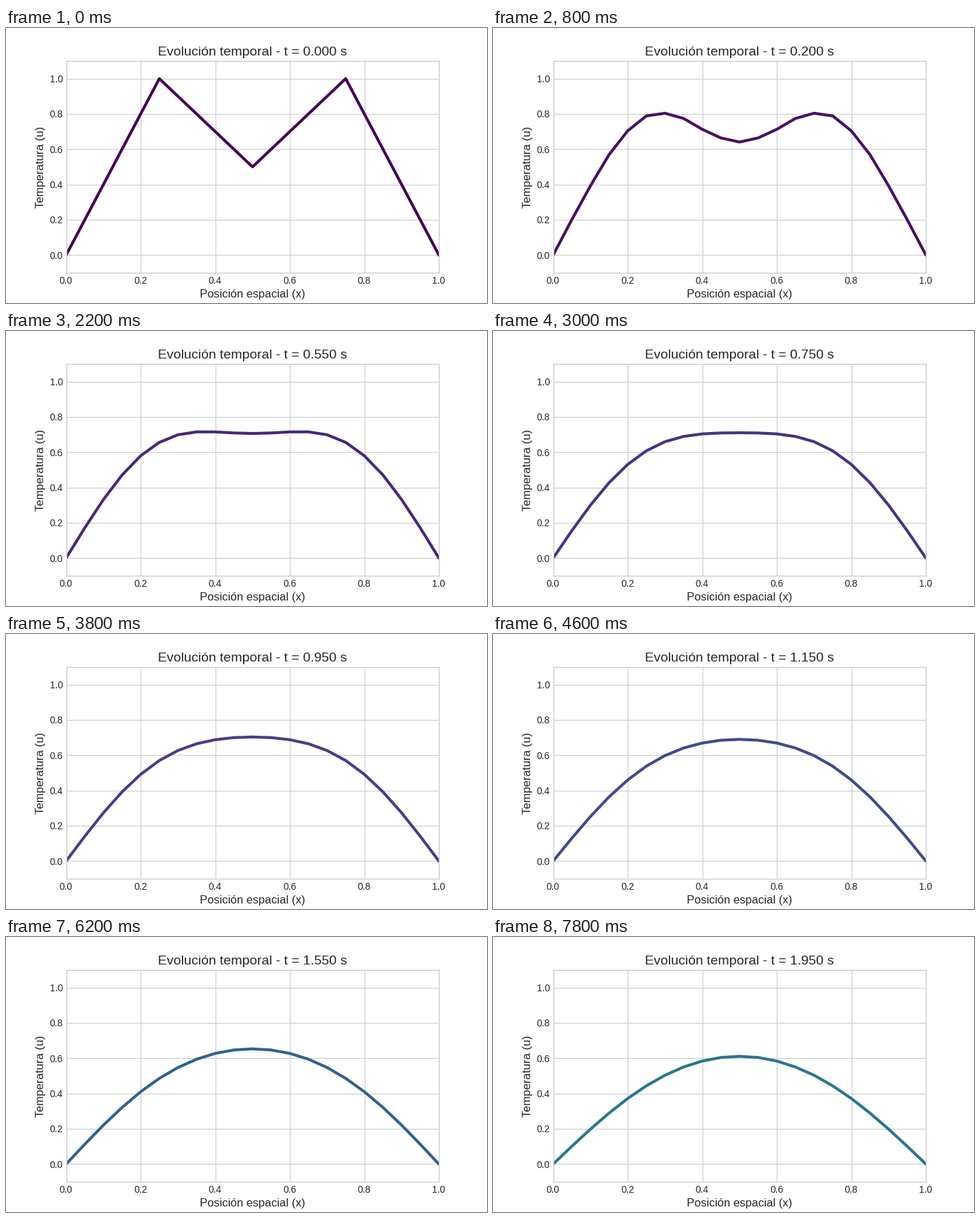
A matplotlib script that plays this animation: 700x400 px, repeating every 8 s.

```python
import numpy as np
import matplotlib.pyplot as plt
from matplotlib.animation import FuncAnimation

plt.style.use("seaborn-v0_8-whitegrid")
plt.rcParams["font.family"] = "Liberation Sans"

FRAMES, INTERVAL = 40, 200
TOTAL_STEPS = 100      # colour scale spans the full simulation
DT = 0.05
DIFFUSIVITY = 0.02

x = np.linspace(0, 1, 21)
ratio = DIFFUSIVITY * DT / (x[1] - x[0]) ** 2


def solve(steps):
    """Explicit finite differences for the heat equation, ends held at 0."""
    u = np.interp(x, [0, 0.25, 0.5, 0.75, 1], [0, 1, 0.5, 1, 0])
    history = [u]
    for _ in range(steps - 1):
        u = u.copy()
        u[1:-1] += ratio * (u[2:] - 2 * u[1:-1] + u[:-2])
        history.append(u)
    return history


history = solve(FRAMES)

fig, ax = plt.subplots(figsize=(7, 4), dpi=100)
ax.set_xlim(0, 1)
ax.set_ylim(-0.1, 1.1)
ax.set_xlabel("Posición espacial (x)", fontsize=12)
ax.set_ylabel("Temperatura (u)", fontsize=12)
title = ax.set_title("", fontsize=14)
line, = ax.plot(x, history[0], lw=3)


def update(i):
    line.set_ydata(history[i])
    line.set_color(plt.cm.viridis(i / TOTAL_STEPS))
    title.set_text(f"Evolución temporal - t = {i * DT:.3f} s")
    return line, title


anim = FuncAnimation(fig, update, frames=FRAMES, interval=INTERVAL,
                     repeat=True, repeat_delay=0, blit=False)
plt.show()
```
